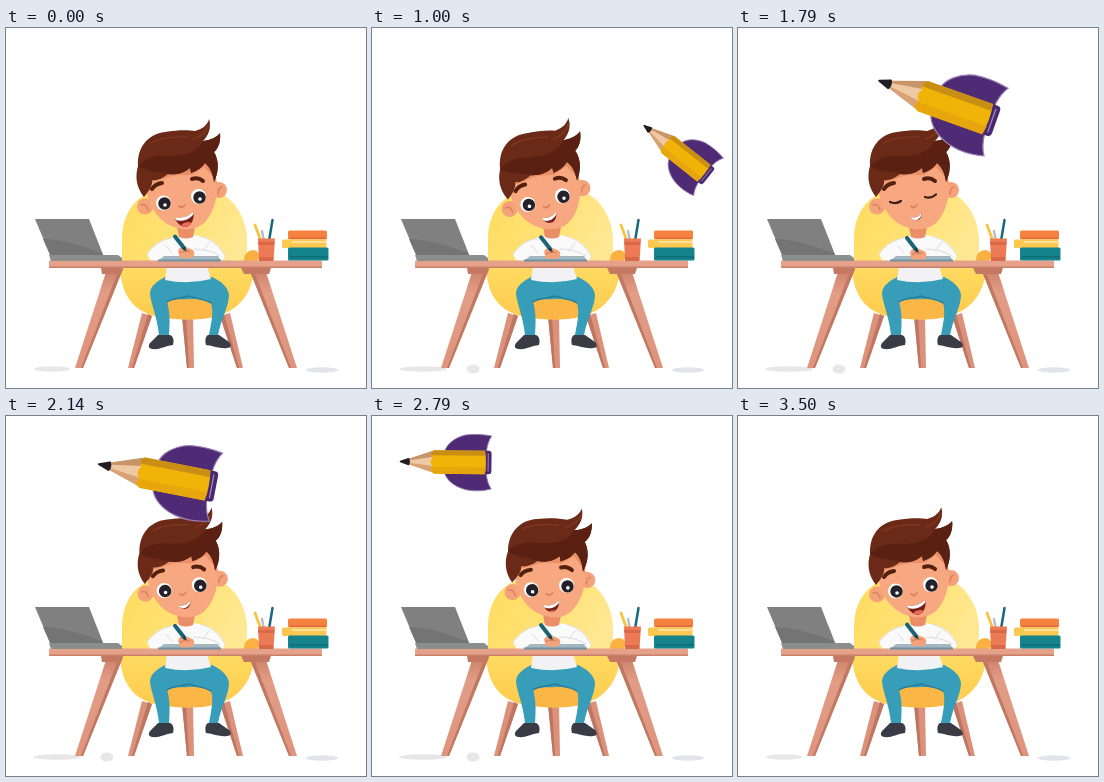
These frames come from a looping animation (360 px wide and 360 px high, 3.57 s). An HTML page:

```html
<!DOCTYPE html>
<html lang="en">
<head>
<meta charset="utf-8">
<title>Boy writing at a desk</title>
<style>
html, body { margin: 0; width: 100%; height: 100%; overflow: hidden; background: #fff; }
svg { display: block; width: 100vw; height: 100vh; }
.line { fill: none; stroke-linecap: round; stroke-linejoin: round; }
</style>
</head>
<body>
<svg viewBox="0 0 360 360">
  <defs>
    <linearGradient id="chair" x1="0" x2="1" y1=".2" y2=".5">
      <stop offset="0" stop-color="#ffdc62"/>
      <stop offset=".55" stop-color="#ffe276"/>
      <stop offset="1" stop-color="#ffe894"/>
    </linearGradient>
    <linearGradient id="seat" x1="0" x2="0" y1="0" y2="1">
      <stop offset="0" stop-color="#ffdb62"/>
      <stop offset="1" stop-color="#fdca4c"/>
    </linearGradient>
    <linearGradient id="wood" x1="0" x2="0" y1="0" y2="1">
      <stop offset="0" stop-color="#cf8069"/>
      <stop offset=".25" stop-color="#e29d86"/>
      <stop offset="1" stop-color="#de937c"/>
    </linearGradient>
    <clipPath id="smile"><path id="lips"/></clipPath>
  </defs>

  <!-- floor shadows -->
  <ellipse id="shadowL" cy="341" ry="2.8" fill="#e6e7e6"/>
  <ellipse id="spot" cx="101" cy="341" rx="6.5" ry="4.5" fill="#e7e7e7"/>
  <ellipse cx="316" cy="342" rx="16" ry="2.7" fill="#e3e4e9"/>

  <!-- chair -->
  <g fill="#dc917b">
    <path d="M136 285L146 288L128 340H122Z"/>
    <path d="M176 288H187L188 340H181Z"/>
    <path d="M214 288L224 285L237 340H231Z"/>
  </g>
  <g fill="#bd7661">
    <path d="M142 286L146 288L128 340H126Z"/>
    <path d="M176 288H180L183 340H181Z"/>
    <path d="M214 288L218 286L233 340H231Z"/>
  </g>
  <path d="M116 210C116 188 128 168 148 164H210C227 168 241 190 241 212V240H116Z" fill="url(#chair)"/>
  <path d="M114 238H248C248 253 243 266 233 276C222 287 204 291.500 182 291.500C158 291.500 140 288 129 278C118 268 114 252 114 238Z" fill="url(#seat)"/>
  <path d="M158 271H208V289Q183 294 158 289Z" fill="#fbb746"/>
  <path d="M238 232C238 225 243 222 248 222C254 223 255 230 251 233H238Z" fill="#fbb142"/>

  <!-- legs and shoes -->
  <path d="M161 248C151 253 144 258 144 266C145 276 151 288 153 307H163C164 294 164 283 161 274C169 270 176 272 183 271C190 271 199 271 205 275C208 284 205 296 203 307H212C215 291 223 278 223 267C222 258 214 253 206 249Z" fill="#379db9"/>
  <path class="line" d="M161 274C168 269 176 271 183 268C191 271 199 271 205 275" stroke="#237f9d" stroke-width="1.5"/>
  <path d="M152 307H164C168 309 168 313 167 317C158 318 154 322 146 321C142 320 142 317 145 314Z" fill="#393b45"/>
  <path d="M202 307H213L223 314C226 317 225 320 221 320C214 321 208 318 200 317C199 313 199 309 202 307Z" fill="#393b45"/>

  <!-- torso -->
  <path d="M161 238L159 252Q182 257 205 251L201 238Z" fill="#f2f1f3"/>
  <path d="M165 210Q180 205 195 208.500C206 211 214 217 219 228L216 234H145L141 226C146 218 154 212 165 210Z" fill="#fafafb"/>
  <path class="line" d="M141 226Q150 213 165 210M219 228Q211 213 195 208.500M160 218L166 225M203 215L197 223M188 221Q203 221 214 228" stroke="#dcdbe2" stroke-width="1"/>
  <path d="M171 199H189L187 209Q180 212 173 209Z" fill="#e98e68"/>

  <!-- desk -->
  <g fill="url(#wood)">
    <path d="M101 241H117L77 340H69Z"/>
    <path d="M243 241H259L291 340H283Z"/>
  </g>
  <g fill="#bf7862">
    <path d="M113 241H117L77 340H75Z"/>
    <path d="M243 241H247L285 340H283Z"/>
  </g>
  <path d="M95 240H117L114 246H96ZM235 240H265L263 246H238Z" fill="#c57963"/>
  <rect x="43" y="232.500" width="273" height="7.500" rx="1" fill="#e5a18a"/>
  <rect x="43" y="238.500" width="273" height="1.500" rx=".7" fill="#ca7f69"/>

  <!-- laptop -->
  <path d="M29 191H83L98 229H45Z" fill="#808081"/>
  <path d="M37 211C57 211 75 218 96 225L98 229H45Z" fill="#747475"/>
  <path d="M43 227H112L116 230V233H45Z" fill="#8c8d8d"/>

  <!-- cup and books -->
  <path class="line" d="M249 197L255 213" stroke="#f5c443" stroke-width="2.8"/>
  <path class="line" d="M256 203L258 213" stroke="#b8bdc5" stroke-width="2.4"/>
  <path class="line" d="M266.500 192L263 213" stroke="#17697b" stroke-width="2.5"/>
  <path d="M252 210.500H269L267.500 233H253Z" fill="#ec7a55"/>
  <path d="M252 214H268.500L268 217H252.500ZM253 229H267.500L267 233H253Z" fill="#d96848"/>
  <rect x="282" y="202.500" width="39" height="9" rx="1.500" fill="#f5823f"/>
  <path d="M284 209.500H320V211H284Z" fill="#e06a38"/>
  <rect x="276" y="211.500" width="44.500" height="8.500" rx="1.500" fill="#fdc850"/>
  <path d="M286 213H320V215H286Z" fill="#fee09a"/>
  <rect x="282" y="219.500" width="40.500" height="13" rx="1.500" fill="#14838b"/>
  <path d="M284 228H322V230H284Z" fill="#0f727b"/>

  <!-- notebook and writing hand -->
  <path d="M158 228H212L215 233H152Z" fill="#a3b7c1"/>
  <path d="M152 231.500H215V233.500H152Z" fill="#7292a2"/>
  <g id="hand">
    <path d="M172 223Q174 218 180 219L187 222Q190 226 186 230H174Z" fill="#f3a27a"/>
    <path class="line" d="M169 208.500L178 220" stroke="#1c6475" stroke-width="4"/>
    <path class="line" d="M178 220L180 223" stroke="#173c49" stroke-width="2"/>
    <path class="line" d="M174 225Q179 222 184 224" stroke="#d9805d" stroke-width="1.200"/>
  </g>

  <g id="head">
    <circle cx="139" cy="178.500" r="8" fill="#f4a27a"/>
    <circle cx="213" cy="162" r="8" fill="#f4a27a"/>
    <path class="line" d="M135 177Q140 175 142 182M216 159Q212 160 212 166" stroke="#dc8260" stroke-width="1.500"/>
    <path d="M140 158C140 142 155 132 175 131C197 130 210 142 211 158C211 172 207 185 199 194C191 202 179 203 168 199C153 194 141 177 140 158Z" fill="#f8a880"/>
    <path d="M140 160L147 154C157 152 164 147 174 147L186 147L198 139L206 148L211 157L209 142L190 128L150 132L138 148Z" fill="#e99068"/>
    <path d="M138 169C130 159 129 148 132 138C131 119 142 106 159 104C171 102 182 102 189 103C197 101 202 96 203 91C206 100 202 108 197 113C205 112 211 109 214 105C215 114 212 121 208 124C214 134 212 146 208 154C207 146 204 139 199 135C195 141 190 143 185 145L184 140C177 146 169 147 162 146C156 151 150 153 146 152C147 157 143 163 138 169Z" fill="#6b2a17"/>
    <path d="M132 138C139 130 150 127 163 128C181 128 193 122 197 113C205 112 211 109 214 105C215 114 212 121 208 124C214 134 212 146 208 154C207 146 204 139 199 135C195 141 190 143 185 145L184 140C177 146 169 147 162 146C154 143 140 144 132 138Z" fill="#5a2113"/>
    <path class="line" d="M145 115Q158 108 181 109M188 111Q199 107 203 97" stroke="#7d3720" stroke-width="1.500"/>
    <path class="line" d="M146 161Q149 156 156 155M186 151Q192 149 197 153" stroke="#55210f" stroke-width="4"/>
    <g id="open">
      <g fill="#fff"><circle cx="157.500" cy="175" r="7.500"/><circle cx="192.500" cy="168.500" r="7.500"/></g>
      <g fill="#24212a"><circle cx="158.500" cy="175.500" r="6.200"/><circle cx="193.500" cy="169.500" r="6.200"/></g>
      <g fill="#fff"><circle cx="159" cy="177" r="1.800"/><circle cx="194" cy="171" r="1.800"/></g>
    </g>
    <path id="shut" class="line" d="M152 174Q158 176.500 163 173M187 169Q193 171 198 166.500" stroke="#3b2018" stroke-width="2.200"/>
    <path class="line" d="M173 178Q176 181 179 177" stroke="#df805e" stroke-width="1.800"/>
    <g id="mouth">
      <path id="lipFill" fill="#762119"/>
      <g clip-path="url(#smile)">
        <path d="M-11 0Q0 4 11 -3V-1Q2 7 -9 3Z" fill="#fff" stroke="#fff"/>
        <ellipse cx="2" cy="10" rx="6" ry="3" fill="#ee6a59"/>
      </g>
    </g>
  </g>

  <!-- pencil rocket, tip at its origin -->
  <g id="rocket">
    <g fill="#4f2b76" stroke="#9a80b4" stroke-width="1.200">
      <path d="M60 -14C62 -23 72 -33 88 -37C101 -39 113 -38 124 -36C120 -30 118 -24 117 -14Z"/>
      <path d="M60 14C62 23 72 33 88 37C101 40 113 39 124 36C120 30 118 24 117 14Z"/>
    </g>
    <rect x="112" y="-16" width="12" height="32" rx="4" fill="#492871"/>
    <path class="line" d="M119.500 -12V12" stroke="#a893be" stroke-width="1.200"/>
    <path d="M0 0L46 -16V15Z" fill="#efc9a4"/>
    <path d="M0 0L46 -16V-7Z" fill="#c8946a"/>
    <path d="M0 0L46 6V15Z" fill="#d9a275"/>
    <path d="M0 0L11 -4Q13 0 11 4Z" fill="#211d22" stroke="#211d22" stroke-width="2" stroke-linejoin="round"/>
    <path d="M46 -16H115Q118 0 115 16H46Q39 11 44 6Q38 0 44 -6Q39 -11 46 -16Z" fill="#f0b408"/>
    <path d="M46 -16H115L116 -9H43Q40 -12 46 -16Z" fill="#c98f14"/>
    <path d="M44 7H116.500L115 16H46Q39 11 44 7Z" fill="#e6a60c"/>
  </g>
  <rect id="speck" x="52" y="33" width="2" height="3" fill="#222"/>
</svg>

<script>
const LOOP = 3570, STEPS = 50, STEP = LOOP / STEPS;
const $ = id => document.getElementById(id);
const set = (id, name, value) => $(id).setAttribute(name, value);
const show = (id, on) => set(id, 'visibility', on ? 'visible' : 'hidden');

// time, tip x, tip y, angle, scale
const flight = [
  [430, 363, 153, 44, 0.45],
  [1000, 272, 97.5, 38.5, 0.665],
  [1790, 140.5, 52.5, 19.4, 1],
  [2500, 51, 48.5, 3.5, 0.85],
  [2860, 22, 45, 0, 0.7],
  [3070, -4, 46, -2, 0.6]
];

const slope = (i, k) => {
  const a = flight[Math.max(i - 1, 0)], b = flight[Math.min(i + 1, flight.length - 1)];
  return (b[k] - a[k]) / (b[0] - a[0]);
};

// cubic Hermite curve through the flight points
function flightAt(t) {
  let i = 0;
  while (i < flight.length - 2 && t >= flight[i + 1][0]) i++;
  const a = flight[i], b = flight[i + 1], d = b[0] - a[0];
  const u = (t - a[0]) / d, u2 = u * u, u3 = u2 * u;
  return [1, 2, 3, 4].map(k =>
    (2 * u3 - 3 * u2 + 1) * a[k] + (3 * u2 - 2 * u3) * b[k] +
    d * ((u3 - 2 * u2 + u) * slope(i, k) + (u3 - u2) * slope(i + 1, k)));
}

// eased swing: 0, -1, 0, 1, 0 over one loop
function swing(t) {
  const p = t / LOOP * 4, q = Math.floor(p), u = p - q;
  const e = u * u * (3 - 2 * u), from = [0, -1, 0, 1][q], to = [-1, 0, 1, 0][q];
  return from + (to - from) * e;
}

function draw(t) {
  const wave = Math.cos(2 * Math.PI * t / LOOP);
  set('head', 'transform', `rotate(${3.6 * swing(t)} 180 203)`);
  set('hand', 'transform', `translate(0 ${0.7 * (1 - wave)})`);

  const blink = Math.abs(t - LOOP / 2) < 80;
  show('open', !blink);
  show('shut', blink);

  const gape = 0.7 + 0.3 * wave;
  const lips = `M-11 0Q0 4 11 -3C11 ${7 * gape} 5 ${12 * gape} 0 ${12 * gape}C-5 ${11 * gape} -9 ${6 * gape} -11 0Z`;
  set('lips', 'd', lips);
  set('lipFill', 'd', lips);
  set('mouth', 'transform', `translate(178 188) rotate(-8) scale(${0.3 + 0.6 * gape} .92)`);

  const wide = t > 700 && t < 2800;
  set('shadowL', 'cx', wide ? 51 : 46);
  set('shadowL', 'rx', wide ? 24 : 18);
  show('spot', wide);

  const flying = t > 435 && t < 3060;
  show('rocket', flying);
  if (flying) {
    const [x, y, angle, scale] = flightAt(t);
    set('rocket', 'transform', `translate(${x} ${y}) rotate(${angle}) scale(${scale})`);
    set('rocket', 'opacity', Math.min(1, Math.max(0, (3070 - t) / 190)));
  }
  show('speck', Math.abs(t - 3070) < 30);
}

const start = performance.now();
function tick() {
  const t = (performance.now() - start) % LOOP;
  draw(Math.min(STEPS - 1, Math.floor((t + 5) / STEP)) * STEP);
  requestAnimationFrame(tick);
}
tick();
</script>
</body>
</html>
```
